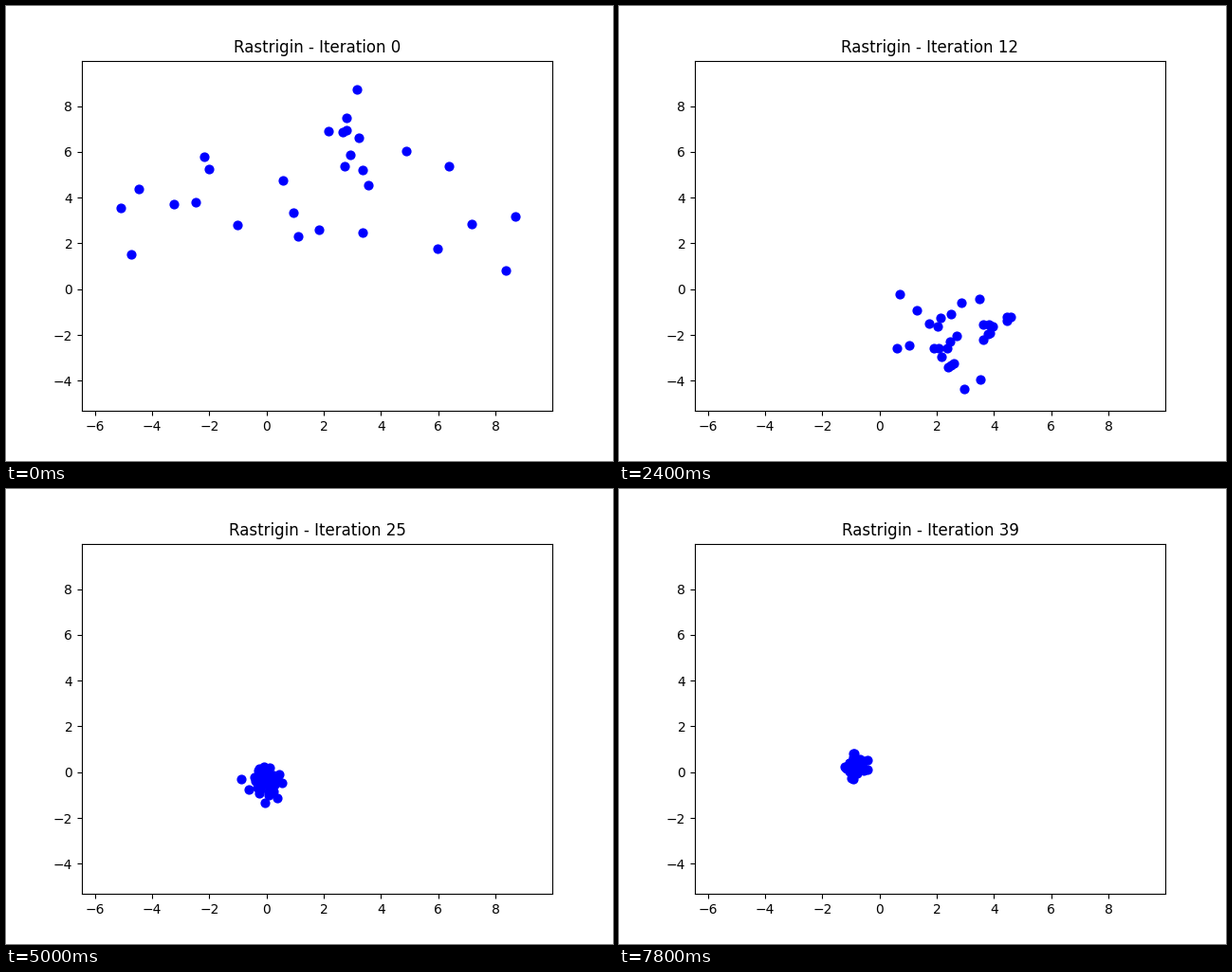
Recreate the animation shown at these times as a matplotlib script. Size 640 px wide and 480 px high, loop 8 s.

```python
import numpy as np
import matplotlib.pyplot as plt
from matplotlib.animation import FuncAnimation

FRAMES, INTERVAL, SWARM = 40, 200, 30
XLIM, YLIM = (-6.45, 9.98), (-5.32, 9.985)

# Iterations at which the swarm's centre and spread are fixed
KEYS = np.array([0, 5, 9, 15, 21, 30, 39])
# Columns: centre x, centre y, spread x, spread y
STATES = np.array([
    [1.79, 4.71, 3.65, 2.20],
    [5.00, 0.80, 1.75, 1.30],
    [4.35, -1.25, 1.20, 1.20],
    [1.10, -2.20, 1.00, 0.78],
    [0.47, -0.96, 0.47, 0.50],
    [-0.58, 0.00, 0.25, 0.33],
    [-0.85, 0.30, 0.21, 0.28]])
SLOPES = np.gradient(STATES, KEYS, axis=0)

rng = np.random.default_rng(7)


def random_cloud():
    """Random offsets with zero mean and unit spread."""
    pts = np.clip(rng.normal(size=(SWARM, 2)), -2, 2)
    return (pts - pts.mean(0)) / pts.std(0)


cloud_a, cloud_b = random_cloud(), random_cloud()
speed = rng.uniform(0.1, 0.3, (SWARM, 1))


def state_at(t):
    """Cubic Hermite interpolation of the swarm's centre and spread."""
    k = min(np.searchsorted(KEYS, t, side="right") - 1, len(KEYS) - 2)
    span = KEYS[k + 1] - KEYS[k]
    u = (t - KEYS[k]) / span
    s = u * u * (3 - 2 * u)
    return ((1 - s) * STATES[k] + s * STATES[k + 1]
            + span * u * (1 - u) * ((1 - u) * SLOPES[k] - u * SLOPES[k + 1]))


def swarm_at(t):
    """Each particle circles the moving centre while the swarm contracts."""
    state = state_at(t)
    offsets = np.cos(speed * t) * cloud_a + np.sin(speed * t) * cloud_b
    offsets = (offsets - offsets.mean(0)) / offsets.std(0)
    return state[:2] + state[2:] * offsets


fig, ax = plt.subplots(figsize=(6.4, 4.8), dpi=100)
ax.set(xlim=XLIM, ylim=YLIM, xticks=range(-6, 9, 2), yticks=range(-4, 9, 2))
dots = ax.scatter(*swarm_at(0).T, s=40, color="blue")
title = ax.set_title("Rastrigin - Iteration 0")


def update(i):
    dots.set_offsets(swarm_at(i))
    title.set_text(f"Rastrigin - Iteration {i}")
    return dots, title


anim = FuncAnimation(fig, update, frames=FRAMES, interval=INTERVAL,
                     repeat=True, repeat_delay=0)
plt.show()
```
